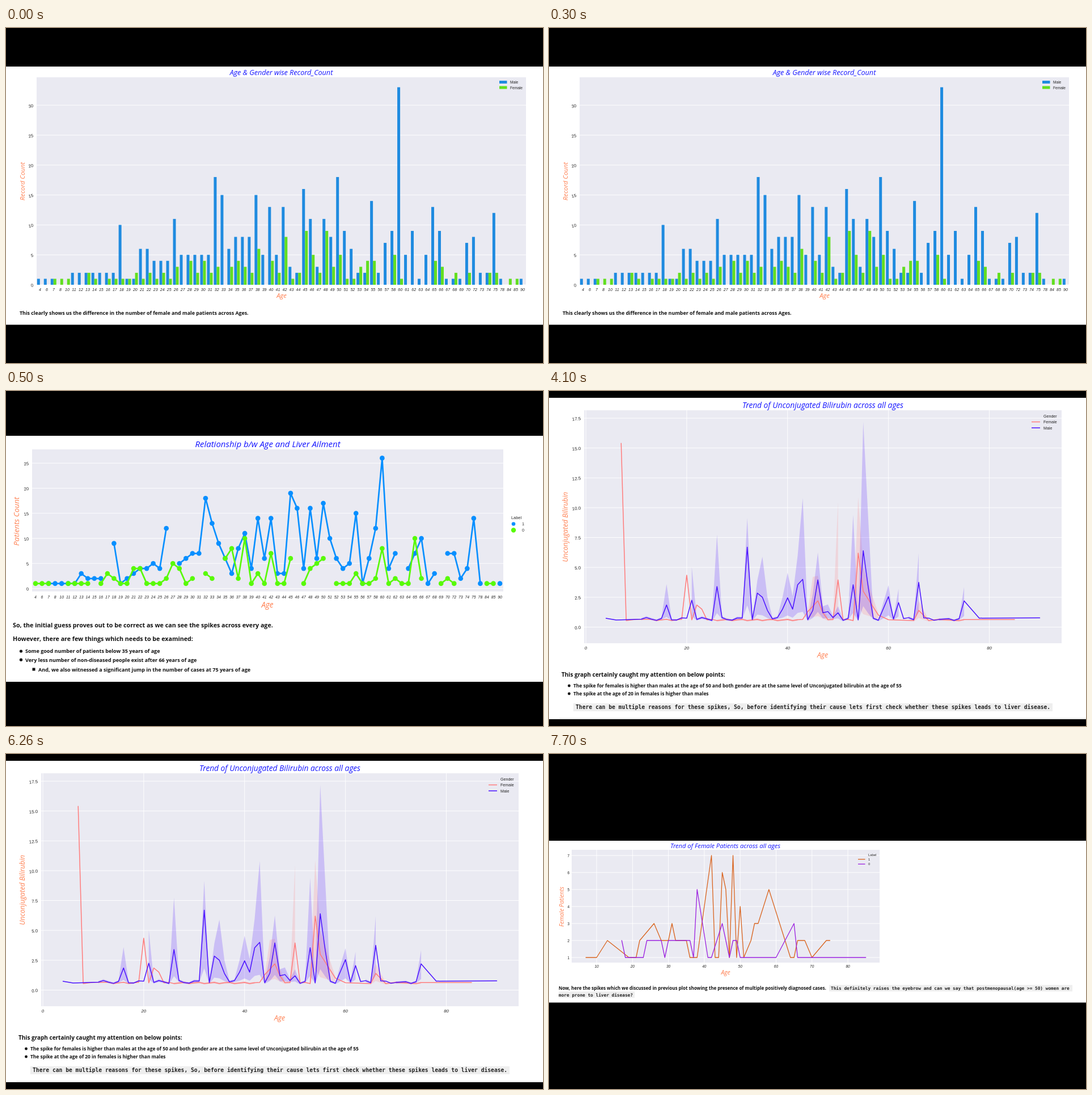
An HTML page for the animation above (8 s loop, 947x591 px).

```html
<!DOCTYPE html>
<html lang="en">
<head>
<meta charset="utf-8">
<title>Charts by age</title>
<style>
html, body { margin: 0; width: 100%; height: 100%; overflow: hidden; background: #000; }
svg { position: absolute; left: 0; top: 0; width: 947px; height: 591px; }
text { white-space: pre; }
.tick { font-family: "Liberation Sans", Arial, sans-serif; fill: #262626; }
.label { font-family: "Open Sans", "Noto Sans", sans-serif; font-style: italic; }
.body { font-family: "Open Sans", "Noto Sans", sans-serif; font-weight: 700; fill: #111; }
.code { font-family: "DejaVu Sans Mono", monospace; font-weight: 700; fill: #222; }
</style>
</head>
<body>
<svg id="stage" viewBox="0 0 947 591"></svg>
<script>
const stage = document.getElementById('stage');
const range = (a, b, step = 1) => Array.from({ length: Math.floor((b - a) / step) + 1 }, (_, i) => a + i * step);
const bell = (v, centre, width) => Math.exp(-(((v - centre) / width) ** 2));

const ages = [4, ...range(6, 8), 10, ...range(11, 58), ...range(60, 70), ...range(72, 75), 78, 84, 85, 90];
const womenOnly = [8, 10, 84, 85];

// Counts follow a bell curve over age; the peaks and dips that stand out are set by age
const malePeaks = { 18: 10, 19: 1, 20: 1, 21: 6, 22: 6, 26: 11, 32: 18, 33: 15, 35: 8, 36: 8, 37: 8, 38: 15,
  40: 13, 42: 13, 43: 3, 44: 2, 45: 16, 46: 11, 48: 11, 49: 8, 50: 18, 51: 9, 52: 6, 55: 14, 57: 7, 58: 9,
  60: 33, 61: 5, 62: 9, 64: 5, 65: 13, 66: 9, 70: 7, 72: 8, 73: 2, 74: 2, 75: 12 };
const femalePeaks = { 7: 1, 13: 2, 21: 1, 28: 4, 30: 4, 35: 4, 38: 6, 40: 4, 42: 8, 45: 9, 46: 5, 47: 2, 48: 9,
  49: 3, 50: 5, 51: 1, 53: 3, 54: 4, 55: 4, 58: 5, 60: 1, 65: 4, 66: 3, 68: 2, 70: 2, 74: 2, 75: 2 };
const healthyPeaks = { 17: 4, 21: 4, 22: 4, 27: 5, 28: 4, 35: 6, 36: 8, 38: 10, 42: 7, 45: 6, 48: 4, 49: 5,
  50: 6, 60: 8, 65: 10 };
const noHealthy = [8, 10, 15, 31, 34, 46, 51, 67, 68];

const men = age => womenOnly.includes(age) ? 0 : malePeaks[age] ?? Math.round(1 + 4.5 * bell(age, 34, 16));
function women(age) {
  if (womenOnly.includes(age)) return 1;
  const most = age % 6 === 3 ? 0 : age % 2 ? 1.9 : 3.3;
  return femalePeaks[age] ?? Math.round(most * bell(age, 34, 16));
}
const total = age => men(age) + women(age);
function healthy(age) {
  if (noHealthy.includes(age) || (age > 72 && men(age))) return 0;
  return Math.min(total(age), healthyPeaks[age] ?? Math.round(.5 + .12 * total(age)));
}
const ill = age => total(age) - healthy(age);

// age: [mean, upper bound]; elsewhere the level wobbles around its base
const maleSpikes = { 16: [1.85, 3.6], 21: [2.25, 5.05], 26: [3.4, 7.75], 32: [6.7, 9.15], 34: [2.85, 3.9],
  35: [2.5, 5.9], 36: [1.4, 2.5], 39: [1.5, 2.5], 40: [2.45, 4.55], 41: [1.5, 2.6], 42: [3.55, 6], 43: [4, 10.8],
  45: [1.4, 2.8], 46: [3.95, 6.25], 47: [1.2, 1.75], 48: [1.3, 1.9], 50: [1.2, 1.75], 53: [3.55, 9.4],
  55: [6.4, 17.2], 56: [3.3, 9], 60: [2.55, 3.5], 62: [2.05, 3.2], 66: [3.75, 6.2], 75: [2.2, 3.35] };
const femaleSpikes = { 7: [15.4], 20: [4.35, 4.35], 22: [1.85, 2], 23: [1.5], 44: [1.3, 1.3], 45: [1.75, 4.2],
  46: [2.2, 4.3], 47: [1.2, 1.8], 50: [3.95, 10.5], 54: [6.2, 10.9], 55: [3, 5], 58: [1, 1.1], 66: [1.4, 2.2] };
const maleBase = age => .68 + .12 * Math.sin(age * 1.7);
const femaleBase = age => .6 + .06 * Math.sin(age * 2.1);

// Corners of the two lines for female patients
const illWomen = [[7, 1], [10, 1], [13, 2], [19, 1], [21, 1], [22, 2], [26, 3], [28, 2], [30, 2], [31, 3],
  [32, 2], [35, 2], [36, 1], [38, 1], [42, 7], [43, 1], [44, 1], [45, 6], [46, 5], [47, 1], [48, 7], [49, 1],
  [50, 4], [51, 1], [53, 2], [54, 3], [55, 3], [58, 5], [64, 1], [65, 1], [66, 2], [68, 2], [70, 1], [74, 2], [75, 2]];
const healthyWomen = [[17, 2], [18, 1], [23, 1], [24, 2], [28, 2], [29, 1], [30, 2], [36, 2], [37, 1], [38, 5],
  [41, 1], [42, 1], [45, 3], [47, 1], [48, 2], [49, 2], [50, 1], [60, 1], [65, 3], [66, 1], [85, 1]];

let slide;
function add(tag, attrs, content) {
  const node = document.createElementNS('http://www.w3.org/2000/svg', tag);
  for (const key in attrs) node.setAttribute(key, attrs[key]);
  if (content !== undefined) node.textContent = content;
  return (slide || stage).appendChild(node);
}
const rect = (x, y, x2, y2, fill) => add('rect', { x, y, width: x2 - x, height: y2 - y, fill });
const dot = (cx, cy, r, fill) => add('circle', { cx, cy, r, fill });
const hline = (x, x2, y, stroke, width) => rect(x, y - width / 2, x2, y + width / 2, stroke);
const poly = (points, stroke, width) => add('polyline',
  { points: points.join(' '), fill: 'none', stroke, 'stroke-width': width, 'stroke-linejoin': 'round', 'stroke-linecap': 'round' });

// y is the middle of the capital letters
function text(kind, x, y, size, content, { turn = 0, anchor = 'start', ...more } = {}) {
  add('text', { class: kind, x, y: y + size * .36, 'font-size': size, 'text-anchor': anchor,
    transform: `rotate(${turn} ${x} ${y})`, ...more }, content);
}
const centred = { anchor: 'middle' };
const slanted = { anchor: 'middle', 'font-style': 'italic' };
const title = (x, y, size, content) => text('label', x, y, size, content, { ...centred, fill: '#1414ff' });
const axis = (x, y, size, content, turn = 0) => text('label', x, y, size, content, { ...centred, turn, fill: '#ff7f50' });
function bullet(x, y, size, content) {
  dot(x - 7.5, y, size * .29, '#111');
  text('body', x, y + .2, size, content);
}

// Splits points into unbroken runs wherever keep() fails
function runs(list, keep) {
  const found = [[]];
  for (const item of list) keep(item) ? found.at(-1).push(item) : found.push([]);
  return found.filter(run => run.length > 1);
}

function newSlide(top, bottom, plot) {
  slide = null;
  slide = add('g', {});
  rect(0, 0, 947, 591, '#000');
  rect(0, top, 947, bottom, '#fff');
  rect(...plot, '#eaeaf2');
  return slide;
}

function grid(plot, y, ticks, tickX, size, turn, format = v => v) {
  for (const v of ticks) {
    hline(plot[0], plot[2], y(v), '#fff', .9);
    text('tick', tickX, y(v) + .4, size, format(v), { anchor: 'end', turn });
  }
}
function uprights(plot, x, ticks, tickY, size) {
  for (const v of ticks) {
    rect(x(v) - .45, plot[1], x(v) + .45, plot[3], '#fff');
    text('tick', x(v), tickY, size, v, slanted);
  }
}

function drawBars() {
  const plot = [54, 87, 917, 453], blue = '#1f8be0', green = '#62df20';
  const g = newSlide(68, 523.5, plot);
  const y = v => 453 - v * 10.56;
  grid(plot, y, range(0, 30, 5), 48, 7.6, -12);
  ages.forEach((age, i) => {
    const x = 60 + i * 851 / 71;
    rect(x - 5.2, y(men(age)), x - .2, 453, blue);
    rect(x - .2, y(women(age)), x + 4.8, 453, green);
    text('tick', x, 461, 7, age, slanted);
  });
  title(485.5, 78.5, 12.6, 'Age & Gender wise Record_Count');
  axis(29, 270.5, 11.4, 'Record Count', -90);
  axis(486, 472, 11.4, 'Age');
  rect(870, 93, 883.5, 98, blue);
  rect(870, 102.5, 883.5, 107.5, green);
  text('tick', 889, 95.8, 6.6, 'Male');
  text('tick', 889, 105.2, 6.6, 'Female');
  text('body', 24, 502.8, 8.83, 'This clearly shows us the difference in the number of female and male patients across Ages.');
  return g;
}

function drawPoints() {
  const plot = [46, 103, 877, 353.5], blue = '#078fff', green = '#58fa06';
  const g = newSlide(79, 513, plot);
  const x = age => 52 + ages.indexOf(age) * 819 / 71, y = v => 348.5 - v * 8.85;
  grid(plot, y, range(0, 25, 5), 40, 7.6, -8);
  for (const age of ages) text('tick', x(age), 363.3, 6.9, age, slanted);
  for (const [count, color] of [[ill, blue], [healthy, green]]) {
    const at = age => [x(age), y(count(age))];
    for (const run of runs(ages, count)) poly(run.map(at), color, 2.7);
    for (const age of ages.filter(count)) dot(...at(age), 4.3, color);
  }
  title(461.5, 94, 15.03, 'Relationship b/w Age and Liver Ailment');
  axis(18.5, 230, 13.4, 'Patients Count', -90);
  axis(461, 377, 13.6, 'Age');
  text('tick', 891, 223.3, 7.4, 'Label');
  dot(895, 234.5, 3.3, blue);
  dot(895, 245.5, 4.2, green);
  text('tick', 910, 234.5, 7.2, '1');
  text('tick', 910, 245.5, 7.2, '0');
  text('body', 12, 412.8, 10.69, 'So, the initial guess proves out to be correct as we can see the spikes across every age.');
  text('body', 12, 437.2, 10.69, 'However, there are few things which needs to be examined:');
  bullet(34, 459, 9.05, 'Some good number of patients below 35 years of age');
  bullet(34, 474.2, 9.05, 'Very less number of non-diseased people exist after 66 years of age');
  rect(46.5, 488.5, 51.5, 493.5, '#111');
  text('body', 57, 491.5, 9.05, 'And, we also witnessed a significant jump in the number of cases at 75 years of age');
  return g;
}

function drawLevels() {
  const plot = [62, 34, 904, 445], pink = '#ff7c7c', violet = '#4a12ff';
  const g = newSlide(12, 579, plot);
  const x = v => 65 + v * 8.894, y = v => 416.5 - v * 21.06;
  uprights(plot, x, range(0, 80, 20), 453.5, 7.8);
  grid(plot, y, range(0, 17.5, 2.5), 56, 7.8, -5, v => v.toFixed(1));
  const series = [[women, femaleBase, femaleSpikes, pink], [men, maleBase, maleSpikes, violet]];
  for (const [count, base, spikes, color] of series) {
    const low = age => spikes[age] ? .6 + .2 * (spikes[age][0] - .6) : base(age) * .85;
    const high = age => spikes[age]?.[1] ?? base(age) * 1.15;
    // A single record has no spread, so the band breaks there
    for (const run of runs(ages.filter(count), age => count(age) > 1)) {
      const edge = [...run.map(age => [x(age), y(low(age))]), ...run.map(age => [x(age), y(high(age))]).reverse()];
      add('polygon', { points: edge.join(' '), fill: color, opacity: .2 });
    }
  }
  for (const [count, base, spikes, color] of series)
    poly(ages.filter(count).map(age => [x(age), y(spikes[age]?.[0] ?? base(age))]), color, 1.5);
  title(483, 24.7, 13.75, 'Trend of Unconjugated Bilirubin across all ages');
  axis(28.5, 240, 12.2, 'Unconjugated Bilirubin', -90);
  axis(482.5, 466, 12.4, 'Age');
  text('tick', 872, 44, 7.1, 'Gender');
  hline(851, 866, 54.5, pink, 1.5);
  hline(851, 866, 65, violet, 1.5);
  text('tick', 872, 54.5, 7.1, 'Female');
  text('tick', 872, 65, 7.1, 'Male');
  text('body', 22, 500.3, 10, 'This graph certainly caught my attention on below points:');
  bullet(43, 520, 8.39, 'The spike for females is higher than males at the age of 50 and both gender are at the same level of Unconjugated bilirubin at the age of 55');
  bullet(43, 534, 8.39, 'The spike at the age of 20 in females is higher than males');
  rect(43, 551, 888, 565, '#eee');
  text('code', 47, 558, 9.66, 'There can be multiple reasons for these spikes, So, before identifying their cause lets first check whether these spikes leads to liver disease.');
  hline(18, 947, 577.5, '#ddd', 1);
  return g;
}

function drawWomen() {
  const plot = [40, 169, 583, 368], orange = '#d9641f', purple = '#9b20df';
  const g = newSlide(153, 438.5, plot);
  const x = v => 84 + (v - 10) * 6.329, y = v => 359 - (v - 1) * 30;
  uprights(plot, x, range(10, 80, 10), 375, 6.5);
  grid(plot, y, range(1, 7), 36, 6.5, 0);
  for (const [corners, color] of [[illWomen, orange], [healthyWomen, purple]])
    poly(corners.map(([age, v]) => [x(age), y(v)]), color, 1.3);
  title(311, 162, 11.13, 'Trend of Female Patients across all ages');
  axis(22.5, 269.5, 10.2, 'Female Patients', -90);
  axis(311.5, 385, 10.4, 'Age');
  text('tick', 563, 177.7, 5.9, 'Label');
  hline(545, 557.5, 185.7, orange, 1.3);
  hline(545, 557.5, 194.2, purple, 1.3);
  text('tick', 563, 185.7, 5.9, '1');
  text('tick', 563, 194.2, 5.9, '0');
  text('body', 17, 413.2, 8.01, 'Now, here the spikes which we discussed in previous plot showing the presence of multiple positively diagnosed cases.');
  rect(494, 407.5, 923, 418.8, '#eee');
  rect(17, 419, 151, 430.3, '#eee');
  text('code', 497, 413.3, 7.77, 'This definitely raises the eyebrow and can we say that postmenopausal(age >= 50) women are');
  text('code', 17, 424.8, 7.77, 'more prone to liver disease?');
  return g;
}

// Each slide covers the ones before it from its start until the loop ends
const loop = 8000;
function showFrom(node, start) {
  const offset = start / loop;
  node.animate([{ opacity: 0, offset: 0 }, { opacity: 0, offset }, { opacity: 1, offset }, { opacity: 1, offset: 1 }],
    { duration: loop, iterations: Infinity });
}
drawBars();
showFrom(drawPoints(), 500);
showFrom(drawLevels(), 4100);
showFrom(drawWomen(), 7700);
</script>
</body>
</html>
```
